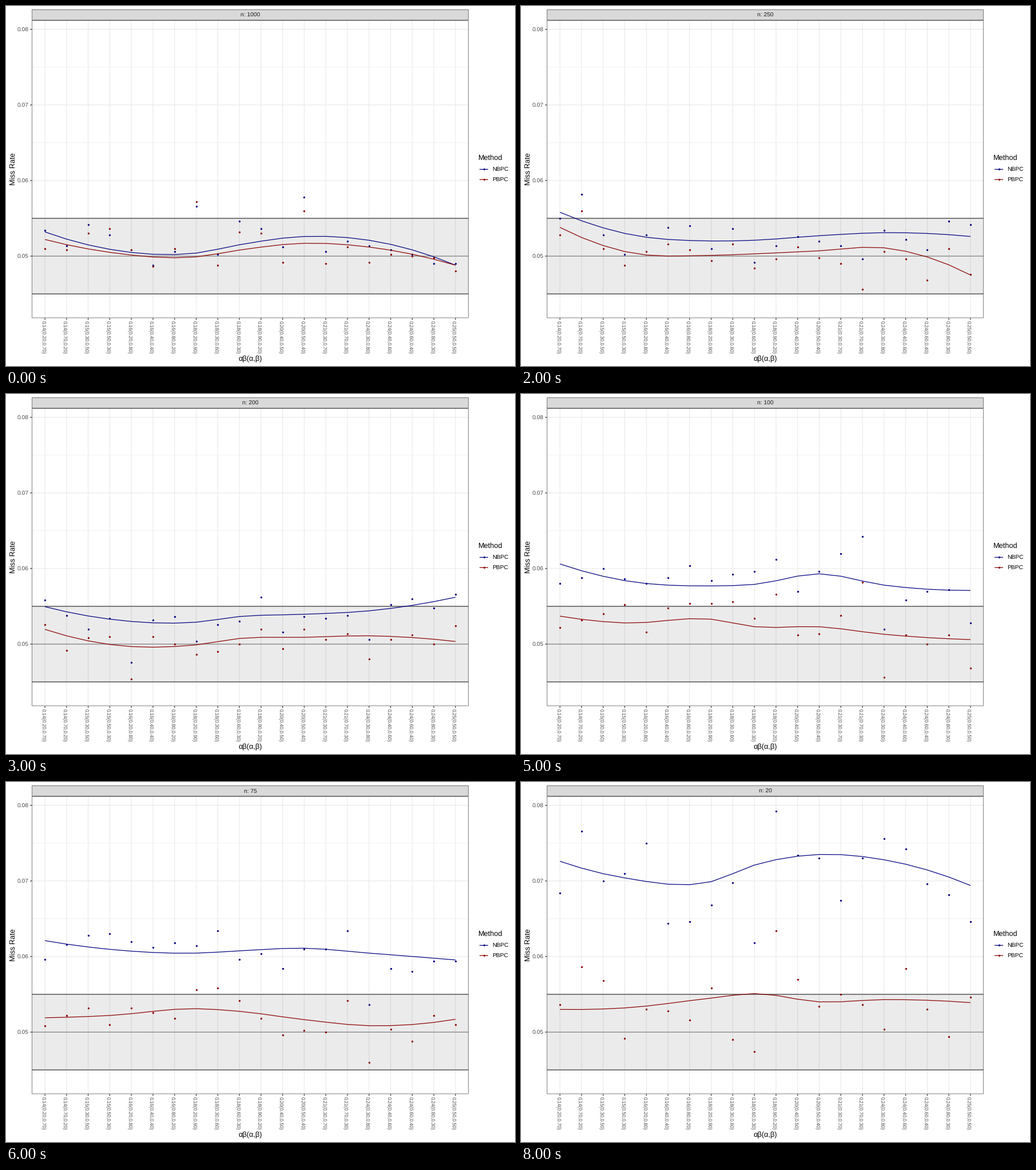
These frames come from a looping animation (890x629 px, 9000 ms). A matplotlib script:

```python
import matplotlib.pyplot as plt
import numpy as np
from matplotlib.animation import FuncAnimation
from matplotlib.patches import Rectangle

W, H, DPI = 890, 629, 128
PX = 72 / DPI                      # one pixel in points
LEFT, RIGHT, TOP, BOTTOM = 45.4, 808.6, 25, 545.2
MID = (LEFT + RIGHT) / 2
NAVY, DARKRED = "#000080", "#8B0000"
GRID, EDGE, AXIS_TEXT = "#EBEBEB", "#333333", "#4D4D4D"
LINE = 1.23

plt.rcParams["font.family"] = "Liberation Sans"
plt.rcParams["text.hinting"] = "none"
plt.rcParams["path.snap"] = False

idx = np.arange(20)
xs = 68.1 + 37.78 * idx
KNOTS = np.array([0, 3, 7, 9, 12, 15, 19])


def ypos(rate):
    return 437 - (rate - 0.05) * 13207


def smooth(v):
    """Cubic Hermite curve through the key rates, sampled at every tick."""
    v = np.asarray(v, float)
    slope = np.gradient(v, KNOTS, edge_order=2)
    c = np.clip(np.searchsorted(KNOTS, idx, side="right") - 1, 0, len(KNOTS) - 2)
    h = KNOTS[c + 1] - KNOTS[c]
    t = (idx - KNOTS[c]) / h
    return ((1 + 2 * t) * (1 - t) ** 2 * v[c] + t * (1 - t) ** 2 * h * slope[c]
            + t * t * (3 - 2 * t) * v[c + 1] + t * t * (t - 1) * h * slope[c + 1])


# Sample size: key rates (1e-4) of both methods
TRENDS = {
    1000: ([532, 509, 504, 515, 526, 521, 488], [522, 505, 499, 508, 517, 512, 488]),
    250: ([558, 530, 520, 521, 527, 531, 526], [538, 506, 501, 503, 507, 511, 475]),
    150: ([541, 536, 538, 552, 552, 557, 598], [501, 493, 497, 512, 511, 511, 532]),
    100: ([606, 584, 577, 579, 593, 578, 571], [537, 528, 533, 523, 523, 513, 506]),
    50: ([636, 635, 632, 636, 629, 631, 620], [501, 516, 529, 532, 510, 504, 528]),
    20: ([726, 704, 699, 721, 735, 728, 694], [530, 532, 545, 551, 540, 543, 539]),
}
# The largest outliers, shared by both methods: tick and offset
SHOCKS = {1000: {7: 65, 12: 45}, 500: {8: -50}, 250: {1: 35, 14: -46},
          200: {4: -50}, 150: {4: -72, 11: 36}, 100: {14: 56, 15: -64},
          75: {15: -66}, 50: {9: -40, 10: 40}, 20: {9: -60, 10: 70}}


def trend(n):
    """Sizes without own key rates lie halfway between their neighbours."""
    if n in TRENDS:
        return np.array(TRENDS[n])
    above = min(k for k in TRENDS if k > n)
    below = max(k for k in TRENDS if k < n)
    return (np.array(TRENDS[above]) + np.array(TRENDS[below])) / 2


def panel(n):
    rng = np.random.default_rng(n)
    shared = np.clip(rng.normal(0, 15, 20), -28, 28)
    for tick, offset in SHOCKS[n].items():
        shared[tick] = offset
    data = []
    for keys in trend(n):
        curve = smooth(keys)
        own = np.clip(rng.normal(0, 1, 20), -1.8, 1.8) * (5 + 400 / n)
        raw = 2 * np.round((curve + shared + own) / 2)
        data.append((ypos(raw / 1e4), ypos(curve / 1e4)))
    return n, data


panels = [panel(n) for n in SHOCKS]

fig = plt.figure(figsize=(W / DPI, H / DPI), dpi=DPI, facecolor="white")
ax = fig.add_axes([0, 0, 1, 1])
ax.set_xlim(0, W)
ax.set_ylim(H, 0)
ax.axis("off")


def line(x, y, color, width=LINE, z=1):
    return ax.plot(x, y, color=color, lw=width * PX, zorder=z,
                   solid_capstyle="butt", solid_joinstyle="round")[0]


def dots(x, y, color, z=5):
    return ax.scatter(x, y, s=(3.3 * PX) ** 2, color=color, lw=0, zorder=z)


def box(y0, y1, z, **style):
    ax.add_patch(Rectangle((LEFT, y0), RIGHT - LEFT, y1 - y0, zorder=z, **style))


def frame(y0, y1, fill):
    """Box whose border is clipped to its inner half."""
    box(y0, y1, 7, fc=fill, ec="none")
    w = LINE / 2
    ax.add_patch(Rectangle((LEFT + w / 2, y0 + w / 2), RIGHT - LEFT - w, y1 - y0 - w,
                           fc="none", ec=EDGE, lw=w * PX, zorder=8))


def label(x, y, s, size, color="black", **kw):
    kw = {"va": "baseline", **kw}
    return ax.text(x, y, s, fontsize=size * PX, color=color, zorder=9, **kw)


# Grid and axes
for rate in (0.045, 0.055, 0.065, 0.075):
    line([LEFT, RIGHT], [ypos(rate)] * 2, GRID, LINE / 2)
for rate in (0.05, 0.06, 0.07, 0.08):
    y = ypos(rate)
    line([LEFT, RIGHT], [y, y], GRID)
    line([LEFT - 3.2, LEFT], [y, y], EDGE)
    label(39.7, y + 3.7, f"{rate:.2f}", 10.2, AXIS_TEXT, ha="right")

pairs = sorted((a * b, a, b) for a in range(2, 10) for b in range(2, 10)
               if 14 <= a * b <= 25)
for x, (ab, a, b) in zip(xs, pairs):
    line([x, x], [TOP, BOTTOM], GRID)
    line([x, x], [BOTTOM, BOTTOM + 3.2], EDGE)
    label(x - 6, 550.4, f"{ab / 100:.2f}({a / 10:.2f},{b / 10:.2f})", 8.55, AXIS_TEXT,
          rotation=270, rotation_mode="anchor", ha="left")

# Tolerance band
box(ypos(0.055), ypos(0.045), 2, fc=(0, 0, 0, 0.08), ec="none")
for rate, color in ((0.055, EDGE), (0.05, "#7F7F7F"), (0.045, EDGE)):
    line([LEFT, RIGHT], [ypos(rate)] * 2, color, z=3)

# Frame, strip, titles
frame(TOP, BOTTOM, "none")
frame(6, TOP, "#D9D9D9")
strip = label(MID, 19.3, "", 10.2, "#1A1A1A", ha="center")
label(MID, 620.5, "αβ(α,β)", 12.7, ha="center")
label(15.8, 285, "Miss Rate", 12.7, rotation=90, rotation_mode="anchor", ha="center")

# Legend
label(826, 268.7, "Method", 12.7)
for y, name, color in ((285.4, "NBPC", NAVY), (303.2, "PBPC", DARKRED)):
    line([828, 843], [y, y], color)
    dots([835.5], [y], color)
    label(850.5, y + 3.7, name, 10.2)

series = [(dots(xs, xs, c, 5), line(xs, xs, c, z=6)) for c in (NAVY, DARKRED)]


def update(i):
    n, data = panels[i]
    strip.set_text(f"n: {n}")
    for (points, curve), (raw, fit) in zip(series, data):
        points.set_offsets(np.column_stack([xs, raw]))
        curve.set_ydata(fit)
    return [strip, *(artist for pair in series for artist in pair)]


anim = FuncAnimation(fig, update, frames=len(panels), interval=1000,
                     repeat=True, repeat_delay=0, blit=False)
plt.show()
```
